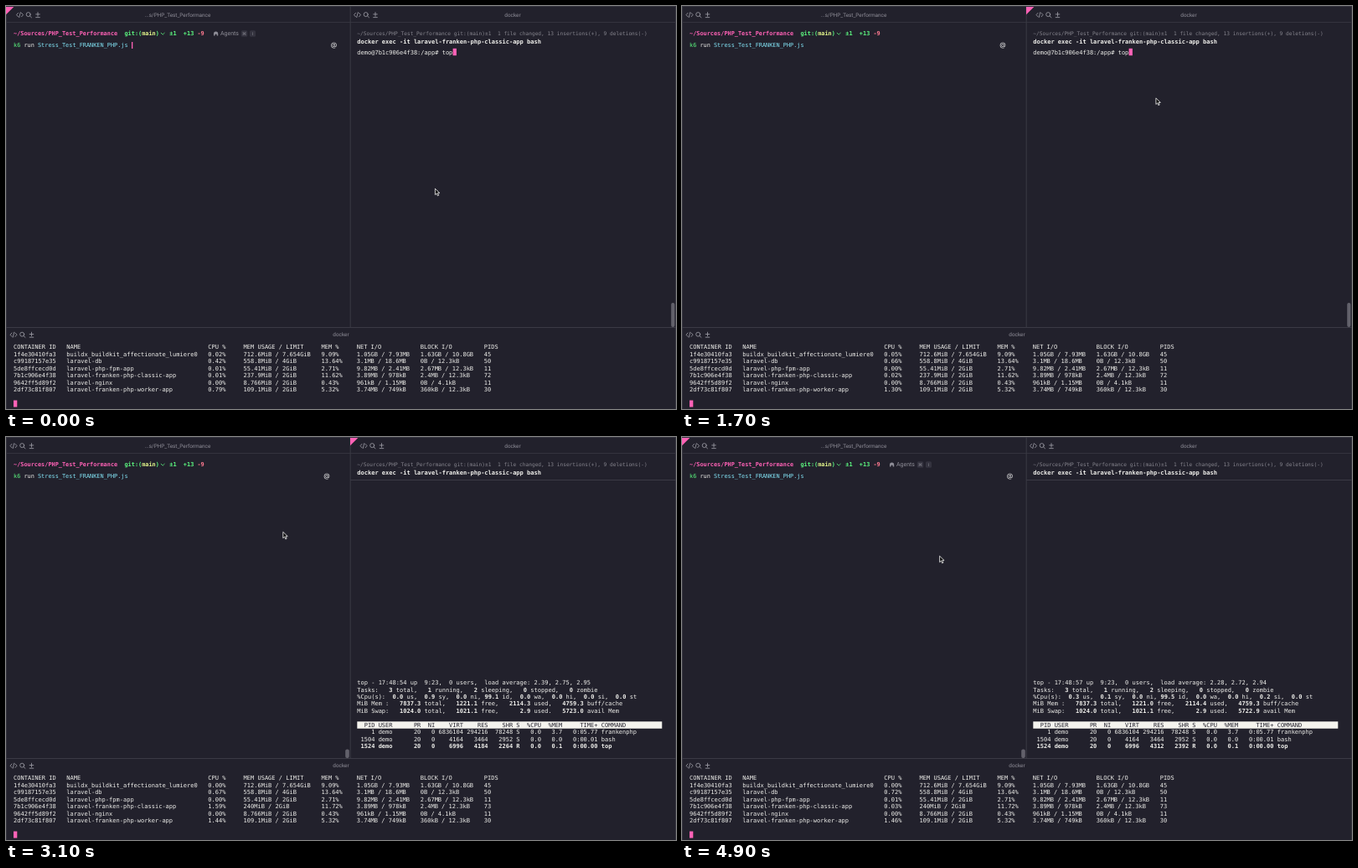
These frames come from a looping animation (800x482 px, 5000 ms). An HTML page:

```html
<!DOCTYPE html>
<html lang="en">
<head>
<meta charset="utf-8">
<title>Terminal panes</title>
<style>
html, body { margin: 0; width: 100%; height: 100%; overflow: hidden; background: #22212c; }
svg { display: block; width: 800px; height: 482px; }
text { white-space: pre; text-rendering: geometricPrecision; font: 7.031px "DejaVu Sans Mono", monospace; fill: #f0f0ec; }
.b { font-weight: 700; }
.in { font-size: 6.88px; }
.dim { font-size: 6.19px; fill: #85848d; }
.ui { font: 6.4px Roboto, "Open Sans", sans-serif; fill: #8f8e98; text-anchor: middle; }
.hint { font-size: 7px; text-anchor: start; }
.key { font-size: 5px; }
.at { font: 500 7.6px Inter, sans-serif; fill: #dededf; text-anchor: middle; }
.pink, text .pink { fill: #ff62b6; }
.red { fill: #ff7a90; }
.green, text .green { fill: #5cf880; }
.yellow { fill: #e6f98c; }
.cyan, text .cyan { fill: #83e4f6; }
.dark { fill: #22212c; }
.line { stroke: #3b3a45; fill: none; }
.soft { stroke: #34333e; }
.icon { stroke: #a3a2ab; stroke-width: .8; fill: none; stroke-linecap: round; stroke-linejoin: round; }
.thumb { fill: #62616b; }
.box { fill: #34333f; }
</style>
</head>
<body>
<svg viewBox="0 0 800 482">
  <defs>
    <g id="tools" class="icon">
      <path d="M-2 -2.2L-4 0L-2 2.2M2 -2.2L4 0L2 2.2M.8 -3L-.8 3"/>
      <circle cx="10.2" cy="-.5" r="2.5"/><path d="M12.1 1.4L14 3.2"/>
      <path d="M21.5 -3V1.6M19.2 -.7H23.8M19.2 3H23.8"/>
    </g>
    <path id="corner" class="pink" d="M0 1H9.3L0 10.3Z"/>
  </defs>

  <rect width="800" height="482" fill="#22212c"/>
  <path class="line soft" d="M0 19.5H800M.5 0V482M799.5 0V482M0 .5H800"/>
  <path class="line" d="M411.2 0V384M0 384.5H800"/>

  <text class="ui" x="205" y="12.7">...s/PHP_Test_Performance</text>
  <text class="ui" x="605" y="12.7">docker</text>
  <text class="ui" x="400" y="395.4">docker</text>
  <use href="#tools" x="9" y="393.2"/>

  <!-- left pane -->
  <text class="in b" x="9" y="35.4"><tspan class="pink">~/Sources/PHP_Test_Performance</tspan><tspan class="green">  git:(<tspan class="yellow">main</tspan>)   ±1  +13 </tspan><tspan class="red">-9</tspan></text>
  <path class="icon" style="stroke:#5cf880" d="M185.2 32.2L187.2 34.2L189.2 32.2"/>
  <text class="in" x="9" y="49.2"><tspan class="green">k6</tspan> run <tspan class="cyan">Stress_Test_FRANKEN_PHP.js</tspan></text>
  <rect class="pink" data-on="0-900" x="150" y="43" width="1.3" height="8"/>

  <g data-on="0-900 3400-5000">
    <use href="#corner"/>
    <use href="#tools" x="16.5" y="10.6"/>
    <use href="#tools" x="419.5" y="10.6"/>
    <path fill="#8f8e98" d="M248 35.6V33.2A2.6 2.8 0 0 1 253.2 33.2V35.6H251.7V33.8H249.5V35.6Z"/>
    <text class="ui hint" x="256" y="35.4">Agents</text>
    <rect class="box" x="280.8" y="29.3" width="7.4" height="7.4" rx="1.5"/>
    <rect class="box" x="291" y="29.3" width="7" height="7.4" rx="1.5"/>
    <text class="ui key" x="284.5" y="34.8">⌘</text>
    <text class="ui key" x="294.5" y="34.8">I</text>
    <text class="at" x="391.5" y="49.2">@</text>
  </g>
  <g data-on="900-3400">
    <use href="#corner" x="411"/>
    <use href="#tools" x="9" y="10.6"/>
    <use href="#tools" x="427" y="10.6"/>
    <text class="at" x="383" y="49.2">@</text>
  </g>

  <!-- right pane -->
  <text class="dim" x="419.3" y="34.9">~/Sources/PHP_Test_Performance git:(main)±1  1 file changed, 13 insertions(+), 9 deletions(-)</text>
  <text class="b" x="419.3" y="44.8">docker exec -it laravel-franken-php-classic-app bash</text>
  <g data-on="0-1860">
    <text x="419.3" y="57.6">demo@7b1c906e4f38:/app# top</text>
    <rect class="pink" x="533.6" y="50.8" width="4.3" height="8.4"/>
  </g>
  <path class="line" data-on="1860-5000" d="M411 51.5H800"/>
  <g id="first" data-on="1860-4860"></g>
  <g id="second" data-on="4860-5000"></g>

  <g data-on="1860-2570">
    <rect x="726" y="24" width="65" height="18" rx="2.5" fill="#302f3b"/>
    <g class="icon" style="stroke:#c4c4ca">
      <path d="M732 36L735.5 32.5" stroke-width="1.4"/>
      <path fill="#c4c4ca" d="M736 29.4L736.8 31.2L738.6 32L736.8 32.8L736 34.6L735.2 32.8L733.4 32L735.2 31.2Z"/>
      <path d="M749.8 29.5V34M747.8 32.2L749.8 34.2L751.8 32.2M746.6 34V36.2H753V34"/>
      <path d="M763 29.8H769.8L767.3 33V36.3L765.5 35.2V33Z"/>
    </g>
    <g fill="#c4c4ca"><circle cx="782" cy="30.2" r=".8"/><circle cx="782" cy="33" r=".8"/><circle cx="782" cy="35.8" r=".8"/></g>
  </g>

  <rect class="thumb" data-on="0-2570" x="794.2" y="355" width="4.2" height="29" rx="2"/>
  <rect class="thumb" data-on="2570-5000" x="405.2" y="373.5" width="4.6" height="10.5" rx="2"/>

  <!-- bottom pane -->
  <g id="stats"></g>
  <rect class="pink" x="9" y="471.6" width="4.3" height="8"/>

  <path id="mouse" d="M0 0V7.4L1.8 5.8L3 8.6L4.3 8L3.1 5.3H5.5Z" fill="#111" stroke="#f4f4f4" stroke-width=".8" stroke-linejoin="round"/>
</svg>
<script>
const LOOP = 5000, ROW = 8.466;
const $ = id => document.getElementById(id);
const line = (x, y, s, cls = "") => `<text class="${cls}" x="${x}" y="${y}">${s}</text>`;

// process monitor
function monitor({ clock, load, cpu, mem, avail, self }) {
  const bold = s => s.replace(/ [\d.]+(?= )/g, n => `<tspan class="b">${n}</tspan>`);
  const names = ["us", "sy", "ni", "id", "wa", "hi", "si", "st"];
  const usage = cpu.map((v, i) => v.toFixed(1).padStart(5) + " " + names[i]).join(",");
  const rows = [
    [`top - ${clock} up  9:23,  0 users,  load average: ${load}`],
    [bold("Tasks:   3 total,   1 running,   2 sleeping,   0 stopped,   0 zombie")],
    [bold("%Cpu(s):" + usage)],
    [bold(`MiB Mem :   7837.3 total,   ${mem[0]} free,   ${mem[1]} used,   4759.3 buff/cache`)],
    [bold(`MiB Swap:   1024.0 total,   1021.1 free,      2.9 used.   ${avail} avail Mem`)],
    [""],
    ["  PID USER      PR  NI    VIRT    RES    SHR S  %CPU  %MEM     TIME+ COMMAND", "dark"],
    ["    1 demo      20   0 6836104 294216  78248 S   0.0   3.7   0:05.77 frankenphp"],
    [" 1504 demo      20   0    4164   3464   2952 S   0.0   0.0   0:00.01 bash"],
    [` 1524 demo      20   0    6996   ${self} R   0.0   0.1   0:00.00 top`, "b"]
  ];
  return `<rect x="419.3" y="340.3" width="364" height="8.4" fill="#f4f3ee"/>` +
    rows.map(([s, cls], i) => line(419.3, 296.1 + i * ROW, s, cls)).join("");
}
$("first").innerHTML = monitor({
  clock: "17:48:54", load: "2.39, 2.75, 2.95", cpu: [0, .9, 0, 99.1, 0, 0, 0, 0],
  mem: ["1221.1", "2114.3"], avail: "5723.0", self: "4184   2264"
});
$("second").innerHTML = monitor({
  clock: "17:48:57", load: "2.28, 2.72, 2.94", cpu: [.3, .1, 0, 99.5, 0, 0, .2, 0],
  mem: ["1221.0", "2114.4"], avail: "5722.9", self: "4312   2392"
});

// container statistics, refreshed once a second
const widths = [15, 40, 10, 22, 10, 18, 18, 0];
const head = ["CONTAINER ID", "NAME", "CPU %", "MEM USAGE / LIMIT", "MEM %", "NET I/O", "BLOCK I/O", "PIDS"];
const boxes = [
  ["1f4e30410fa3", "buildx_buildkit_affectionate_lumiere0", "", "712.6MiB / 7.654GiB", "9.09%", "1.05GB / 7.93MB", "1.63GB / 10.8GB", "45"],
  ["c99187157e35", "laravel-db", "", "558.8MiB / 4GiB", "13.64%", "3.1MB / 18.6MB", "0B / 12.3kB", "50"],
  ["5de8ffcecd0d", "laravel-php-fpm-app", "", "55.41MiB / 2GiB", "2.71%", "9.82MB / 2.41MB", "2.67MB / 12.3kB", "11"],
  ["7b1c906e4f38", "laravel-franken-php-classic-app", "", "237.9MiB / 2GiB", "11.62%", "3.89MB / 978kB", "2.4MB / 12.3kB", "72"],
  ["9642ff5d89f2", "laravel-nginx", "", "8.766MiB / 2GiB", "0.43%", "961kB / 1.15MB", "0B / 4.1kB", "11"],
  ["2df73c81f807", "laravel-franken-php-worker-app", "", "109.1MiB / 2GiB", "5.32%", "3.74MB / 749kB", "360kB / 12.3kB", "30"]
];
const loads = [
  [.02, .42, .01, .01, 0, .79], [.04, .63, 0, 0, 0, 1.21], [.05, .66, 0, .02, 0, 1.3],
  [0, .67, 0, 1.59, 0, 1.44], [.02, .68, 0, 0, 0, 1.46], [0, .72, .01, .03, 0, 1.46]
];
const join = cells => cells.map((c, i) => c.padEnd(widths[i])).join("");
const tables = loads.map((cpu, n) => [head, ...boxes.map((box, i) => {
  const row = [...box];
  row[2] = cpu[i].toFixed(2) + "%";
  if (i === 3 && n > 2) [row[3], row[4], row[7]] = ["240MiB / 2GiB", "11.72%", "73"];
  return row;
})].map((r, i) => line(9, 410.2 + i * ROW, join(r))).join(""));

// time, x, y of the pointer
const path = [
  [0, 512.4, 218.4], [600, 571, 185], [800, 614, 152], [1100, 556.6, 125.8], [1900, 567.6, 107.3],
  [2500, 427.8, 93.6], [2950, 330.8, 113.5], [4450, 330.8, 113.5], [4900, 307.6, 142.3], [LOOP, 307.6, 142.3]
];
function place(t) {
  const i = path.findIndex(p => p[0] > t);
  const [a, b] = [path[i - 1], path[i]];
  const k = (t - a[0]) / (b[0] - a[0]), e = k * k * (3 - 2 * k);
  $("mouse").setAttribute("transform", `translate(${a[1] + (b[1] - a[1]) * e} ${a[2] + (b[2] - a[2]) * e})`);
}

const timed = [...document.querySelectorAll("[data-on]")].map(el =>
  [el, el.dataset.on.split(" ").map(s => s.split("-").map(Number))]);
let shown = -1;
function draw() {
  const t = performance.now() % LOOP;
  for (const [el, spans] of timed)
    el.style.display = spans.some(([a, b]) => t >= a && t < b) ? "" : "none";
  const n = Math.floor((t + 450) / 1000);
  if (n !== shown) $("stats").innerHTML = tables[shown = n];
  place(t);
  requestAnimationFrame(draw);
}
draw();
</script>
</body>
</html>
```
